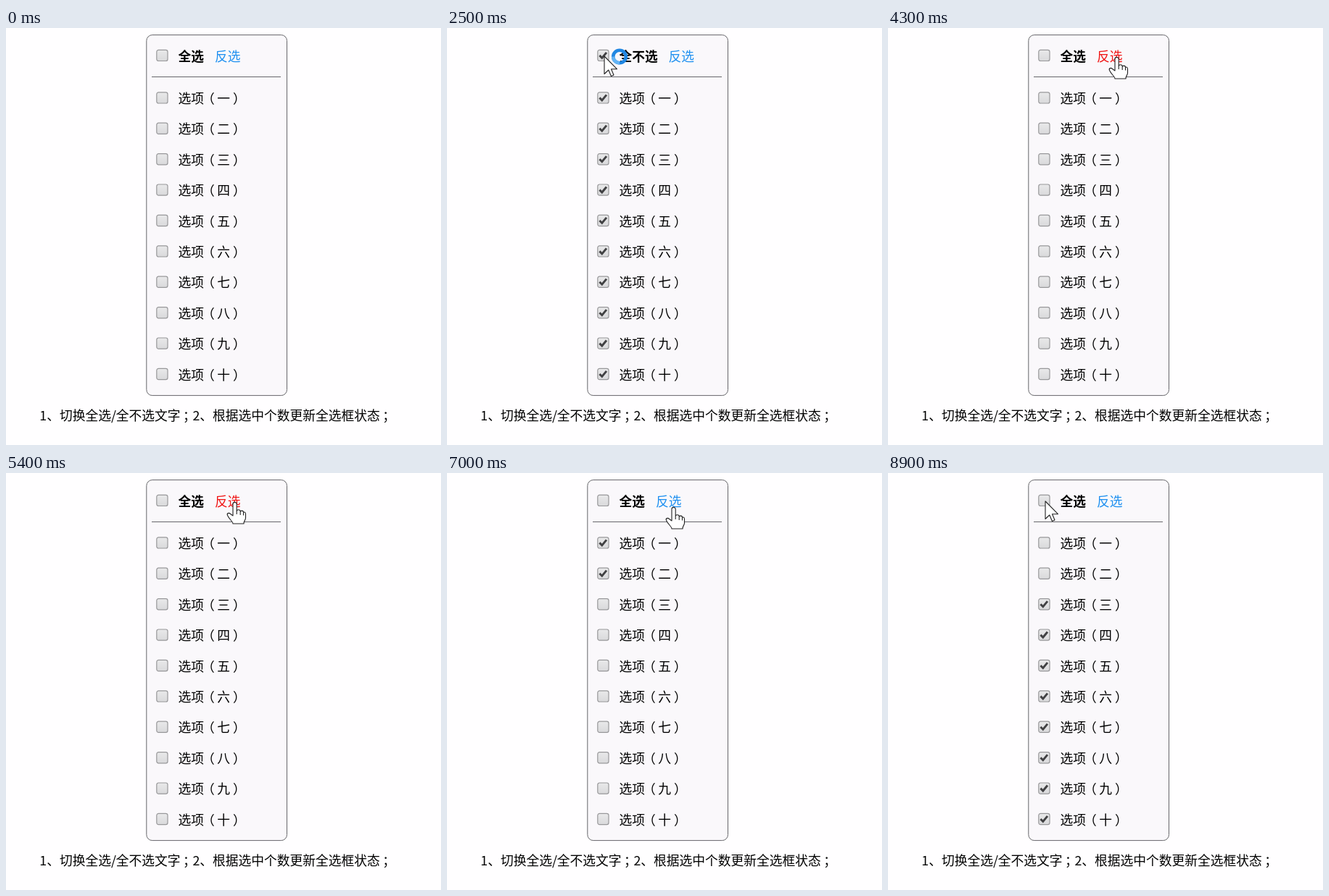
An HTML page that plays this animation: 600x576 px, repeating every 9000 ms.

```html
<!DOCTYPE html>
<html lang="zh-CN">
<head>
<meta charset="utf-8">
<style>
  html, body { margin: 0; width: 100%; height: 100%; overflow: hidden; background: #fffeff; }
  svg { display: block; }
  text { font: 17.75px "Noto Sans CJK SC", "Noto Sans CJK", sans-serif; white-space: pre; }
  .bold { font-weight: bold; }
  .box { fill: url(#face); stroke: #98989a; stroke-width: 1.2; }
  .tick { fill: none; stroke: #414143; stroke-width: 2.9; }
  .pointer { fill: #fff; stroke: #222; stroke-width: 1.1; stroke-linejoin: round; }
</style>
</head>
<body>
<svg id="stage" width="600" height="576" viewBox="0 0 600 576">
  <defs>
    <linearGradient id="face" x2="0" y2="1">
      <stop stop-color="#e9e9ea"/><stop offset="1" stop-color="#d9d9db"/>
    </linearGradient>
  </defs>
  <rect x="193.8" y="9.6" width="193.7" height="498" rx="8" fill="#faf8fb" stroke="#66666a"/>
  <path d="M201 67.5H379" stroke="#66666a"/>
  <g id="list"></g>
  <text id="label" class="bold" x="237.5" y="45.7"></text>
  <text id="link" y="45.7">反选</text>
  <text x="46.3" y="541.7">1、切换全选/全不选文字<tspan dx="3.5">；</tspan><tspan dx="-4.5">2</tspan>、根据选中个数更新全选框状态<tspan dx="3.5">；</tspan></text>
  <g id="cursor">
    <g id="ring" fill="none" stroke-width="4.6">
      <circle cx="21" cy=".5" r="8.8" stroke="#2187e2"/>
      <path id="glint" d="M21 -8.3A8.8 8.8 0 0 1 29.8 .5" stroke="#62b3f4"/>
    </g>
    <path id="arrow" class="pointer" d="M0 0V24.5L5.8 19 9.4 27.5 13 26 9.5 17.7H17.4Z"/>
    <path id="hand" class="pointer" d="M-3 19V3a2.6 2.6 0 0 1 5.2 0V13c0-3 5-3 5 0v1c0-2.6 4.3-2.6 4.3.4v1c0-2 3-2 3 1V22c0 3-2.5 4-2.5 8H-3c0-3-5-6-7.5-11.5c-1.2-3 2-4 4-2zM2.2 13v4M7.2 14v4M11.5 15.4v3"/>
  </g>
</svg>
<script>
const LOOP = 9000, STEP = 100;
const $ = id => document.getElementById(id);
const show = (el, on) => el.setAttribute('visibility', on ? 'visible' : 'hidden');

// Pointer path: time, x, y
const path = [
  [1100, 150, 125], [1200, 191, 75], [1500, 217, 39], [3000, 217, 39],
  [3300, 300, 39.5], [3600, 300, 39.5], [4000, 316, 40], [5500, 316, 40],
  [5900, 216, 98], [6200, 216, 98], [6500, 216, 140], [6700, 216, 140],
  [7000, 313, 47], [7100, 313.5, 43], [7900, 313, 43], [8400, 213, 37],
  [8600, 213, 37], [8900, 217, 39]
];
// Clicks: time, then an option index, 'all' or 'invert'
const clicks = [
  [2200, 'all'], [2800, 'all'], [4500, 'invert'], [5200, 'invert'],
  [6200, 0], [6600, 1], [7300, 'invert']
];

const checkbox = y => `<g transform="translate(207 ${y})">
  <rect class="box" x=".8" y=".8" width="15.2" height="15.2" rx="2.6"/>
  <path class="tick" d="M3.4 8.4L6.8 11.8 13 4.3"/></g>`;
$('list').innerHTML = checkbox(29.5) + [...'一二三四五六七八九十'].map((n, i) => {
  const y = 42.4 * i;
  return checkbox(88 + y) + `<text x="237.5" y="${104 + y}">选项<tspan dx="-3">（</tspan><tspan dx="3.5">${n}</tspan><tspan dx="4">）</tspan></text>`;
}).join('');
const [allTick, ...ticks] = document.querySelectorAll('.tick');

function optionsAt(t) {
  let options = Array(10).fill(false);
  for (const [time, target] of clicks) {
    if (time > t) break;
    const full = options.every(Boolean);
    options = options.map((on, i) =>
      target === 'all' ? !full : target === 'invert' || target === i ? !on : on);
  }
  return options;
}

function pointerAt(t) {
  const next = path.findIndex(p => p[0] > t);
  if (next < 0) return path[path.length - 1].slice(1);
  if (next === 0) return null;
  const [t0, x0, y0] = path[next - 1], [t1, x1, y1] = path[next];
  const u = (t - t0) / (t1 - t0), k = u * u * (3 - 2 * u);
  return [x0 + (x1 - x0) * k, y0 + (y1 - y0) * k];
}

function draw(t) {
  const options = optionsAt(t), full = options.every(Boolean);
  ticks.forEach((tick, i) => show(tick, options[i]));
  show(allTick, full);
  $('label').textContent = full ? '全不选' : '全选';
  const linkX = full ? 305.6 : 288;
  $('link').setAttribute('x', linkX);

  const pointer = pointerAt(t);
  $('cursor').style.display = pointer ? '' : 'none';
  const [x, y] = pointer || [0, 0];
  const over = x > linkX && x < linkX + 36 && y > 28 && y < 50;
  $('link').setAttribute('fill', over && y < 46 ? '#f01414' : '#1e90f0');
  $('cursor').setAttribute('transform', `translate(${x} ${y})`);
  $('hand').style.display = over ? '' : 'none';
  $('arrow').style.display = over ? 'none' : '';
  $('ring').style.display = t >= 2300 && t < 3100 ? '' : 'none';
  $('glint').setAttribute('transform', `rotate(${t * 0.36} 21 .5)`);
}

const start = performance.now();
function tick() {
  const t = (performance.now() - start) % LOOP;
  draw(Math.floor(t / STEP) * STEP);
  requestAnimationFrame(tick);
}
tick();
</script>
</body>
</html>
```
